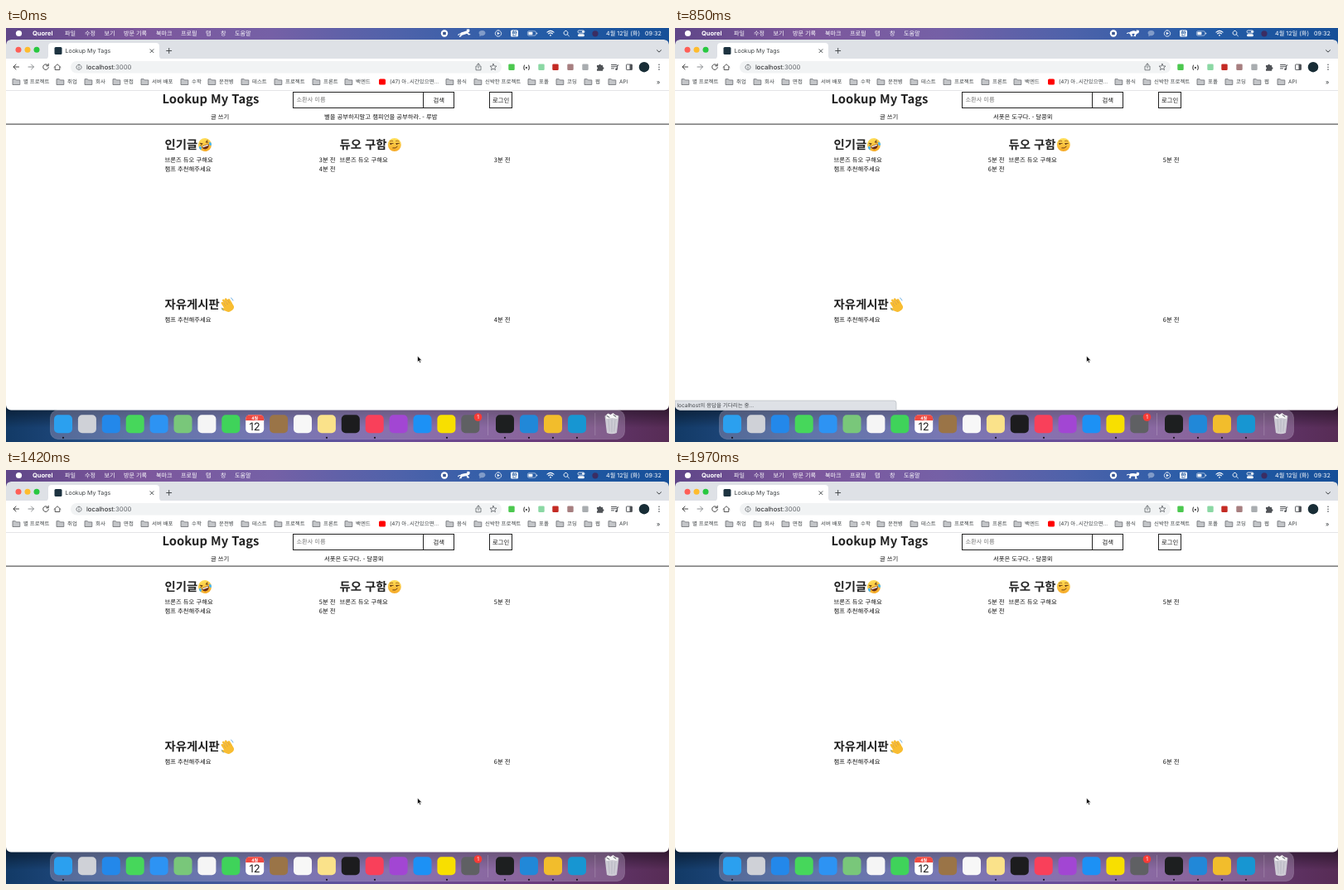
Recreate the animation shown at these times as an HTML page. Size 800x500 px, loop 2000 ms.

```html
<!DOCTYPE html>
<html lang="ko">
<head>
<meta charset="utf-8">
<title>Desktop</title>
<style>
  html, body { margin: 0; width: 100%; height: 100%; overflow: hidden; background: #fff; }
  svg { display: block; width: 100%; height: 100%; }
  text { font-family: Inter, 'Noto Sans CJK KR', 'Noto Sans CJK', sans-serif; text-rendering: geometricPrecision; white-space: pre; }
  .page text { font-family: 'Noto Sans CJK KR', 'Noto Sans CJK', 'Noto Sans', sans-serif; }
  .line { fill: none; stroke-linecap: round; stroke-linejoin: round; }
</style>
</head>
<body>
<svg id="stage" viewBox="0 0 800 500" lang="ko"></svg>
<script>
const LOOP = 2000;
const stage = document.getElementById('stage');

const text = (x, y, s, size, fill = '#222', extra = '') =>
  `<text x="${x}" y="${y}" font-size="${size}" fill="${fill}" ${extra}>${s}</text>`;
const rect = (x, y, w, h, fill, r = 0, extra = '') =>
  `<rect x="${x}" y="${y}" width="${w}" height="${h}" rx="${r}" fill="${fill}" ${extra}/>`;
const dot = (x, y, r, fill, extra = '') =>
  `<circle cx="${x}" cy="${y}" r="${r}" fill="${fill}" ${extra}/>`;
const line = (d, color = '#5f6368', w = 1, extra = '') =>
  `<path class="line" d="${d}" stroke="${color}" stroke-width="${w}" ${extra}/>`;
const group = (id, body, extra = '') => `<g id="${id}" ${extra}>${body}</g>`;
const gradient = (id, colors, dir = '') =>
  `<linearGradient id="${id}" ${dir}>${colors.map((c, i) =>
    `<stop offset="${i / (colors.length - 1)}" stop-color="${c}"/>`).join('')}</linearGradient>`;

function menuBar() {
  const items = [[71, '파일'], [95, '수정'], [118.5, '보기'], [142, '방문 기록'], [181, '북마크'],
    [211, '프로필'], [241, '탭'], [259, '창'], [276, '도움말']];
  return rect(0, 0, 800, 20, 'url(#menu)') +
    rect(110, 0, 29, 13, '#fff', 0, 'id="menuFlash" opacity=".28"') +
    dot(15.5, 6.5, 3.6, '#fff') +
    text(32, 9.1, 'Quorel', 7.5, '#fff', 'font-weight="700"') +
    items.map(([x, s]) => text(x, 9, s, 7.1, '#fff')).join('') +
    dot(529, 6.5, 4.2, '#fff') + rect(527.2, 4.7, 3.6, 3.6, '#3a5590', .6) +
    group('cat', '') +
    '<path d="M570.5 6.2a4 3.2 0 1 1 3 3l-2.3 1 .4-1.8z" fill="#fff" opacity=".38"/>' +
    line('M594 2.8a3.7 3.7 0 1 1-.01 0', '#fff', .8) + '<path d="M592.8 4.7l3.2 1.8-3.2 1.8z" fill="#fff"/>' +
    rect(609, 2.5, 9, 8, '#fff', 1.5) + text(610.2, 9, '한', 7, '#245a9f', 'font-weight="700"') +
    rect(629.4, 3.8, 10, 5.4, 'none', 1.6, 'stroke="#fff" stroke-width=".7" opacity=".75"') +
    rect(630.4, 4.8, 5, 3.4, '#fff', .7) + rect(640.2, 5.5, 1, 2, '#fff', .4) +
    line('M653 5.1q4-3.4 8 0M654.5 6.9q2.5-2.1 5 0', '#fff', 1.1) + dot(657, 8.8, .9, '#fff') +
    line('M675.5 3.4a2.5 2.5 0 1 0 .01 0M677.4 7.8l2 2', '#fff', .9) +
    rect(690, 3, 8, 3, 'none', 1.5, 'stroke="#fff" stroke-width=".8"') + dot(696.3, 4.5, 1.3, '#fff') +
    rect(690, 7.2, 8, 3, '#fff', 1.5) + dot(711, 6.8, 3.6, '#3b2d62') +
    text(724, 9.1, '4월 12일 (화)', 7.2, '#fff') + text(771, 9.1, '09:32', 7.2, '#fff');
}

function tabStrip() {
  const lights = ['#ff5f57', '#febc2e', '#28c840'];
  return '<path d="M0 75V20q0-6 6-6h788q6 0 6 6v55z" fill="#dee1e6"/>' +
    lights.map((c, i) => dot(15 + 11 * i, 26.2, 3.5, c)).join('') +
    '<path d="M47 37.5q4 0 4-4V22q0-4 4-4h126q4 0 4 4v11.5q0 4 4 4z" fill="#fff"/>' +
    rect(58.5, 23, 9, 9, '#1d3340', 1.5, 'id="favicon"') +
    line('M63 23.8a3.7 3.7 0 0 1 3.7 3.7', '#3b78e7', 1, 'id="spinner"') +
    text(71.5, 30.3, 'Lookup My Tags', 7, '#3c4043') +
    line('M174 25.7l4 4m0-4l-4 4', '#3c4043', .9) +
    line('M193.7 27.5h6m-3-3v6', '#3c4043', .9) +
    line('M785.5 26.8l2.5 2.3 2.5-2.3', '#3c4043', 1);
}

function toolbar() {
  const extensions = [[610, '#4cc84f'], [646, '#8bd8a4'], [663, '#c42b24'], [681, '#a77f80'], [699, '#a9adb0']];
  return rect(0, 37, 800, 38.5, '#fff') +
    line('M15.5 47h-6.5m3-3l-3 3 3 3', '#444', 1) +
    line('M27 47h6.5m-3-3l3 3-3 3', '#8b8e91', 1) +
    line('M50.8 45.3a3.3 3.3 0 1 0 .5 2.3M51.2 43.3v2.5h-2.5', '#444', 1, 'id="reload"') +
    line('M45 44.3l5.4 5.4m0-5.4l-5.4 5.4', '#444', 1, 'id="stop"') +
    line('M58 47.5l4-3.8 4 3.8M59.2 47v3.5h5.6v-3.5', '#444', .9) +
    rect(78, 40, 520, 14.5, '#f1f3f4', 7.2) +
    line('M88 44.2a3.1 3.1 0 1 0 .01 0M88 47.1v1.7', '#5f6368', .8) + dot(88, 45.7, .5, '#5f6368') +
    text(97, 50, 'localhost<tspan fill="#62666b">:3000</tspan>', 7.7, '#202124') +
    line('M568.5 46h-1.5v4.8h6v-4.8h-1.5M570 48.5v-5.5m-1.7 1.6l1.7-1.7 1.7 1.7', '#5f6368', .8) +
    line('M588 43.3l1.1 2.6 2.9.2-2.2 1.9.7 2.7-2.5-1.5-2.5 1.5.7-2.7-2.2-1.9 2.9-.2z', '#5f6368', .8) +
    extensions.map(([x, c]) => rect(x - 3.7, 43.6, 7.4, 7.4, c, 1.2)).join('') +
    text(628, 49.8, '(•)', 7, '#333', 'text-anchor="middle" font-weight="700"') +
    '<path d="M713 45h2.3a1.3 1.3 0 1 1 2.6 0h2.3v2.3a1.3 1.3 0 1 1 0 2.6v1.8h-7.2v-2a1.3 1.3 0 0 0 0-2.5z" fill="#505357"/>' +
    line('M730.5 44.5h6m-6 2.2h6m-6 2.2h3M737.5 49.5v-4.5h1.5', '#505357', 1) + dot(736.5, 49.8, 1.3, '#505357') +
    rect(748.5, 44, 7, 6.5, 'none', .6, 'stroke="#505357" stroke-width=".9"') + rect(752.5, 44, 3, 6.5, '#505357') +
    dot(770, 47.2, 6.2, '#182d36') +
    [44.3, 47.2, 50.1].map(y => dot(788, y, .8, '#505357')).join('');
}

function bookmarks() {
  const list = [[8, '별 프로젝트'], [61, '취업'], [95, '회사'], [129, '면접'], [163, '서버 배포'], [211, '수학'],
    [244, '운전병'], [284, '테스트'], [324, '프로젝트'], [370, '프론트'], [409, '백엔드'], [531, '음식'],
    [565, '신박한 프로젝트'], [630, '포폴'], [664, '코딩'], [698, '웹'], [727, 'API']];
  const folder = x =>
    `<path d="M${x} 61.7h3.3l1 1.2h4.5v5.6h-8.8z" fill="#c4c6c9" stroke="#6a6d71" stroke-width=".8" stroke-linejoin="round"/>`;
  return list.map(([x, s]) => folder(x) + text(x + 13, 67.3, s, 6.45, '#3c4043')).join('') +
    rect(450, 61.5, 8, 7, '#f00', 1.5) +
    text(463, 67.3, '(47) 아..시간있으면...', 6.45, '#3c4043') +
    text(785, 67.5, '»', 7.5, '#3c4043');
}

const faceBase = dot(0, 0, 8, 'url(#emoji)');
const tear = x => `<ellipse cx="${x}" cy="1.4" rx="1.4" ry="2.2" fill="#4bb8ef"/>`;

function laughing() {
  return `<g transform="translate(240 141) rotate(-22)">${faceBase}` +
    '<path d="M-4.5 .5h9a4.5 5 0 0 1-9 0z" fill="#6b2e16"/><path d="M-3.8 1h7.6l-.5 1.3h-6.6z" fill="#fff"/>' +
    line('M-4.8-3.8l2.5 1.5-2.5 1M4.8-3.8l-2.5 1.5 2.5 1', '#603414', .9) +
    tear(-6.5) + tear(6.5) + '</g>';
}

function smirking() {
  return `<g transform="translate(468.8 141)">${faceBase}` +
    line('M-5.5-4.2q1.7-1.2 3.4-.4M1.7-4.6q1.7-.8 3.4.4', '#8a4a12', .7) +
    line('M-5.3-1.6h3.6M1.9-1.6h3.6M-2 4q3.2 .8 5.4-1.8', '#603414', .9) +
    dot(-4.4, -.9, .9, '#603414') + dot(2.8, -.9, .9, '#603414') + '</g>';
}

function wave() {
  return '<g transform="translate(267 334.5) rotate(-32) scale(1.22)">' +
    line('M-3.2 1V-4.3M-.8 0V-6M1.7 0V-5.5M4 1V-3.5M-3 4l-3-3', '#f8bd32', 2.2) +
    rect(-4.3, -1, 9.3, 8, '#f8bd32', 3.5) +
    line('M-2-.5v-3.5M.5-.5v-4M2.9-.5v-3.5', '#c98319', .4) + '</g>' +
    line('M271.5 326q2 1 2.5 3M260 338q.6 2 2.5 3', '#4a9cdd', .8);
}

function page() {
  const body = (x, y, s, extra) => text(x, y, s, 7.35, '#111', extra);
  const head = (x, y, s) => text(x, y, s, 14.4, '#222', 'font-weight="700"');
  const age = (x, y, kind) => body(x, y, '', `class="${kind}" text-anchor="end"`);
  const box = (x, w) => rect(x, 77.5, w, 19, '#fff', 0, 'stroke="#222"');
  return '<g class="page">' + rect(0, 75, 800, 387, '#fff') + rect(0, 75, 800, .7, '#d8dadd') +
    text(188.5, 91.4, 'Lookup My Tags', 14.8, '#222', 'font-weight="600"') +
    box(346.5, 157) + box(503.5, 37) + box(583.5, 27) +
    text(350.5, 89.4, '소환사 이름', 7.2, '#757575') +
    body(515.5, 89.5, '검색') + body(587, 89.5, '로그인') +
    body(247, 109.6, '글 쓰기') + body(384, 109.6, '', 'id="quote"') +
    rect(0, 115.6, 800, 1, '#333') +
    head(191.5, 146.3, '인기글') + laughing() +
    head(402.5, 146.3, '듀오 구함') + smirking() +
    head(191.5, 339.3, '자유게시판') + wave() +
    body(191.5, 161.9, '브론즈 듀오 구해요') + age(397.5, 161.9, 'recent') +
    body(191.5, 173.4, '챔프 추천해주세요') + age(397.5, 173.4, 'older') +
    body(402.5, 161.9, '브론즈 듀오 구해요') + age(608.5, 161.9, 'recent') +
    body(191.5, 354.9, '챔프 추천해주세요') + age(608.5, 354.9, 'older') + '</g>';
}

function dock() {
  const apps = ['#2ba0ef', '#cfd1d7', '#2388ea', '#46d75b', '#2d93f3', '#79c77a', '#f5f5f5', '#3fd35a', '#fff',
    '#9a7447', '#f7f7f7', '#fae28a', '#1c1c1e', '#f9405a', '#a246d3', '#1c91f5', '#f8df00', '#5f6063'];
  const tools = ['#1d1f20', '#2188d8', '#f2bd2c', '#1796d2'];
  const icons = (x, step, colors) =>
    colors.map((c, i) => rect(x + step * i - 11, 467.3, 22, 22, c, 5)).join('');
  return rect(53.5, 461.5, 693, 35, '#c9b6da', 9, 'fill-opacity=".32" stroke="#fff" stroke-opacity=".25" stroke-width=".6"') +
    icons(69, 28.9, apps) +
    '<path d="M289.2 474v-1.7q0-5 5-5h12q5 0 5 5v1.7z" fill="#f04a41"/>' +
    text(300.2, 473, '4월', 5, '#fff', 'text-anchor="middle" font-weight="700"') +
    text(300.2, 486.2, '12', 13, '#222', 'text-anchor="middle"') +
    dot(569.5, 470, 4.8, '#f73b36') + text(569.5, 472.3, '1', 6.5, '#fff', 'text-anchor="middle"') +
    icons(602, 29, tools) +
    [581, 710.5].map(x => rect(x, 465, .7, 27, '#fff', 0, 'opacity=".25"')).join('') +
    '<path d="M722.5 468.5h17l-2.5 20.5q-6 2.5-12 0z" fill="#d8dbdf" opacity=".88"/>' +
    '<path d="M723.5 468l3-2.5 3 1.5 3-2 3 2.5 3 .5-1 4-6-1-7 1z" fill="#f7f7f7"/>' +
    line('M727 473l1.2 14M731 473v15M735 473l-1.2 14', '#a9adb5', .6) +
    line('M725 468.5l3 1.7M733 467.5l3 2', '#51565e', 1) +
    [69, 387, 445, 532, 602, 631, 660, 689].map(x => dot(x, 494.8, 1.1, '#17131d')).join('');
}

function status() {
  return group('status',
    '<path d="M0 450h264q3 0 3 3v9H0z" fill="#dee1e6" stroke="#b9bdc2" stroke-width=".7"/>' +
    text(2.5, 458.3, 'localhost의 응답을 기다리는 중...', 6.5, '#44474b'));
}

stage.innerHTML = '<defs>' +
  gradient('menu', ['#5f4688', '#7d579c', '#7560a6', '#4d62aa', '#245ca7', '#164f98']) +
  gradient('desk', ['#123a66', '#2c5592', '#5058a0', '#6c4d98', '#6a3c7c', '#572c55']) +
  gradient('shade', ['#0008', '#0000'], 'x2="0" y2="1"') +
  gradient('emoji', ['#ffdf59', '#f5a927'], 'x2="0" y2="1"') +
  '<clipPath id="window"><rect x="0" y="14" width="800" height="447.5" rx="6"/></clipPath></defs>' +
  rect(0, 0, 800, 500, 'url(#desk)') + rect(0, 455, 800, 28, 'url(#shade)') + menuBar() +
  `<g clip-path="url(#window)">${tabStrip()}${toolbar()}${bookmarks()}${page()}${status()}</g>` + dock() +
  '<path d="M496.5 396v7.4l1.7-1.5 1.2 2.7 1.3-.6-1.2-2.6h2.3z" fill="#111" stroke="#fff" stroke-width=".6"/>';

const $ = id => document.getElementById(id);
const show = (id, on) => $(id).setAttribute('visibility', on ? 'visible' : 'hidden');
const fillAll = (kind, s) => stage.querySelectorAll('.' + kind).forEach(n => { n.textContent = s; });

// Stride count over time: the cat changes pace slightly.
const pace = [[0, .1], [210, 1.1], [610, 3.1], [1030, 5.5], [1210, 6.7], [1640, 9.1], [1970, 10.7], [2000, 11]];
function strides(t) {
  const i = pace.findIndex(p => p[0] > t);
  const [t0, s0] = pace[i - 1], [t1, s1] = pace[i];
  return s0 + (s1 - s0) * (t - t0) / (t1 - t0);
}

// Each pose: tilt, front paw reach, hind paw reach, back arch.
const poses = [[-12, 4, -4, 0], [-4, 3.5, -2.5, 0], [2, -2, 2, -1.2], [6, 1, -1, -.4], [-6, 2, -3, -.3]];
function drawCat(t) {
  const [tilt, front, hind, arch] = poses[Math.floor(strides(t) % 1 * 5)];
  const paw = (x, reach, gap) => `M${x} 0L${x + reach * .65 + gap} ${4 - Math.abs(reach) * .3}`;
  $('cat').setAttribute('transform', `translate(553 6.3) rotate(${tilt})`);
  $('cat').innerHTML = line(`M-3 0Q0 ${arch * 2} 3-.5`, '#fff', 3.5) +
    line(paw(3, front, -.6) + paw(3, front, .8) + paw(-3, hind, -.8) + paw(-3, hind, .6), '#fff', 1.1) +
    line('M-4 0Q-6-1-7.5 .5', '#fff', 1.1) +
    '<path d="M3.5-3l1-1.5.8 1 1.3-.6.4 2.3-1 1.8-2.5.2z" fill="#fff"/>';
}

function render(t) {
  const loading = t >= 580 && t < 820;
  const fresh = t >= 820;
  drawCat(t);
  show('menuFlash', t >= 580 && t < 670);
  show('reload', !loading);
  show('stop', loading);
  show('favicon', !loading);
  show('spinner', loading && t >= 640);
  $('spinner').setAttribute('transform', `rotate(${t * 1.2} 63 27.5)`);
  show('status', t >= 580 && t < 1240);
  $('status').setAttribute('opacity', Math.max(0, Math.min(1, (1235 - t) / 90)));
  $('quote').textContent = fresh ? '서폿은 도구다. - 달콩뫼' : '별을 공부하지말고 챔피언을 공부하라. - 루밤';
  fillAll('recent', fresh ? '5분 전' : '3분 전');
  fillAll('older', fresh ? '6분 전' : '4분 전');
}

const start = performance.now();
function tick() {
  render((performance.now() - start) % LOOP);
  requestAnimationFrame(tick);
}
tick();
</script>
</body>
</html>
```
